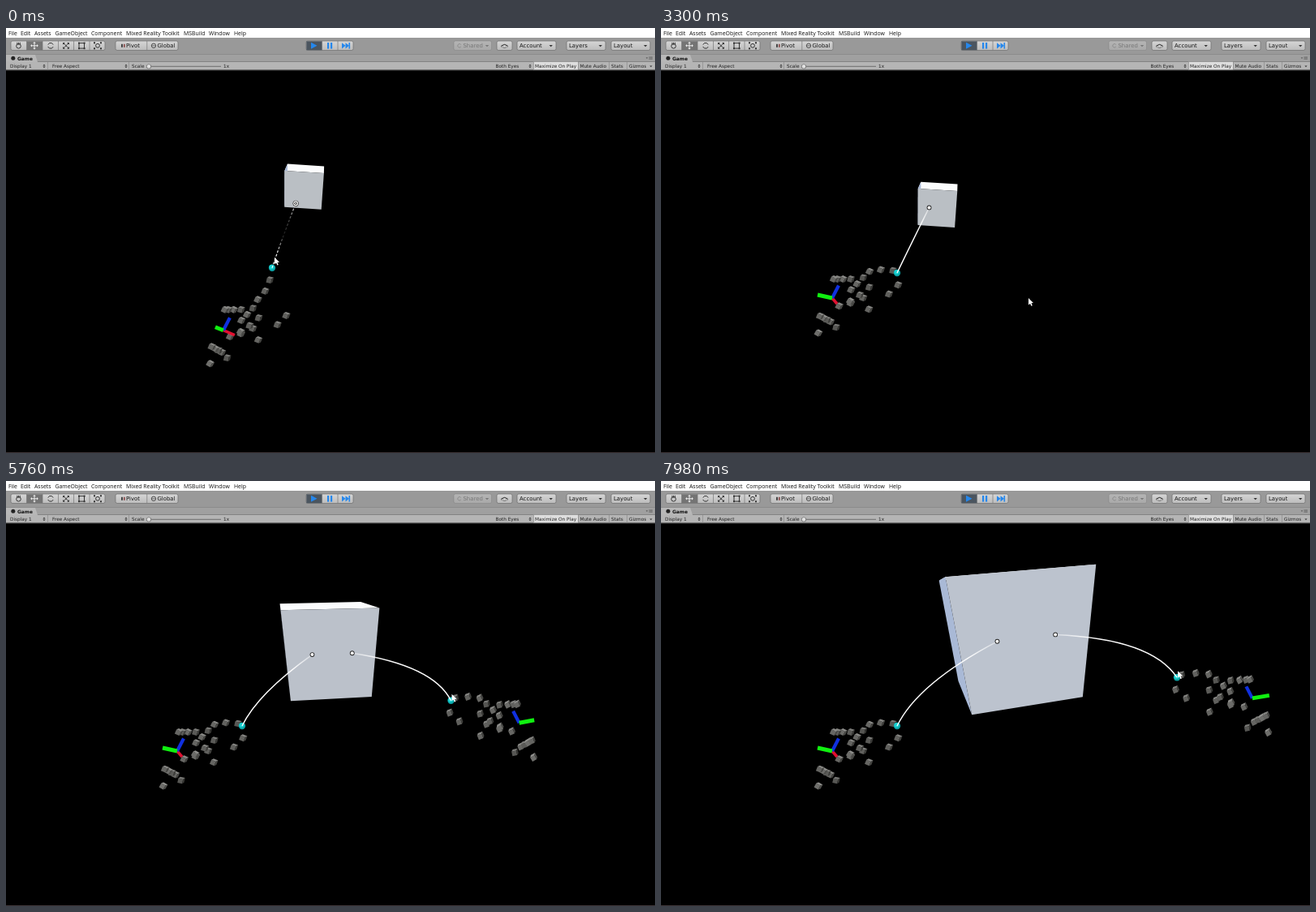
Write an HTML page with a canvas that moves like this. It is 800 px wide and 524 px high and loops after 8 s.

```html
<!DOCTYPE html>
<html lang="en">
<head>
<meta charset="utf-8">
<title>Hand ray manipulation</title>
<style>
html, body { margin: 0; width: 100%; height: 100%; overflow: hidden; background: #000; }
canvas, svg { position: absolute; left: 0; top: 0; display: block; }
.menu { font: 6.9px "Open Sans", sans-serif; fill: #111; }
.bar { font: 6.9px "DejaVu Sans", sans-serif; fill: #161616; }
.row { font: 5.75px "DejaVu Sans", sans-serif; fill: #222; }
.tab { font: bold 5.9px "DejaVu Sans", sans-serif; fill: #111; }
.off { fill: #777; }
</style>
</head>
<body>
<canvas id="stage" width="800" height="524"></canvas>
<svg width="800" height="53">
  <g class="menu">
    <text x="3" y="9">File</text><text x="18" y="9">Edit</text><text x="35" y="9">Assets</text>
    <text x="60.5" y="9">GameObject</text><text x="105" y="9">Component</text>
    <text x="148" y="9">Mixed Reality Toolkit</text><text x="219" y="9">MSBuild</text>
    <text x="250" y="9">Window</text><text x="281" y="9">Help</text>
  </g>
  <g class="bar">
    <text x="148" y="24.3">Pivot</text><text x="186.5" y="24.3">Global</text>
    <text x="563.5" y="24.3" class="off">Shared</text>
    <text x="633" y="24.3">Account</text><text x="694" y="24.3">Layers</text><text x="749" y="24.3">Layout</text>
  </g>
  <text class="tab" x="14" y="39.5">Game</text>
  <g class="row">
    <text x="5" y="49.2">Display 1</text><text x="57" y="49.2">Free Aspect</text>
    <text x="155" y="49.2">Scale</text><text x="268" y="49.2">1x</text>
    <text x="603.5" y="49.2">Both Eyes</text><text x="652" y="49.2">Maximize On Play</text>
    <text x="707.5" y="49.2">Mute Audio</text><text x="746" y="49.2">Stats</text><text x="768" y="49.2">Gizmos</text>
  </g>
</svg>
<script>
const ctx = document.getElementById('stage').getContext('2d');
const LOOP = 8000, STEP = 30;

const mix = (a, b, k) => a + (b - a) * k;
const clamp = (v, lo = 0, hi = 1) => Math.max(lo, Math.min(hi, v));
const ramp = (t, from, to) => clamp((t - from) / (to - from));
const rad = deg => deg * Math.PI / 180;

// Swings from one turning point [time, ...values] to the next.
function swing(keys, t) {
  let i = 0;
  while (i < keys.length - 2 && t >= keys[i + 1][0]) i++;
  const [a, b] = [keys[i], keys[i + 1]];
  const k = 0.5 - 0.5 * Math.cos(Math.PI * ramp(t, a[0], b[0]));
  return a.slice(1).map((v, c) => mix(v, b[c + 1], k));
}

const LEFT_X = [[0, 328], [430, 303], [830, 372], [1300, 301], [1950, 367], [2350, 289], [2650, 291]];
const RIGHT_X = [[4080, 384], [5150, 388], [5800, 550], [6130, 402], [6600, 589], [7320, 403], [7980, 636]];
const POINTER = [[2750, 291, 285], [3300, 453, 333], [3600, 566, 436], [4050, 386, 336]];

function leftHand(t) {
  const [x] = swing(LEFT_X, t);
  return [x, 302 - 0.17 * (x - 291)];
}

function rightHand(t) {
  const [x] = swing(RIGHT_X, t), d = x - 388;
  return [x, 304 - 0.13 * d - 0.00048 * d * d + 37 * (1 - ramp(t, 4080, 4900))];
}

function poly(points, fill) {
  ctx.beginPath();
  for (const p of points) ctx.lineTo(...p);
  ctx.closePath();
  ctx.fillStyle = fill;
  ctx.fill();
}

function rect(x, y, w, h, fill) {
  ctx.fillStyle = fill;
  ctx.fillRect(x, y, w, h);
}

function dot(x, y, r, fill) {
  ctx.beginPath();
  ctx.arc(x, y, r, 0, Math.PI * 2);
  ctx.fillStyle = fill;
  ctx.fill();
}

function ring(x, y, r, from = 0, to = 2 * Math.PI) {
  ctx.beginPath();
  ctx.arc(x, y, r, from, to);
  ctx.stroke();
}

function bar([x, y], dx, dy, width, color) {
  ctx.beginPath();
  ctx.moveTo(x, y);
  ctx.lineTo(x + dx, y + dy);
  ctx.lineWidth = width;
  ctx.strokeStyle = color;
  ctx.stroke();
}

// Triangle pointing along (dx, dy).
function arrow(x, y, dx, dy, color, wide = 1) {
  poly([[x + dx, y + dy], [x - dy * wide, y + dx * wide], [x + dy * wide, y - dx * wide]], color);
}

// ---- Toolbar ----

function button(x, w, parts = 1) {
  const g = ctx.createLinearGradient(0, 16, 0, 27);
  g.addColorStop(0, '#d6d6d6');
  g.addColorStop(1, '#bdbdbd');
  ctx.beginPath();
  ctx.roundRect(x, 16, w, 11.5, 2);
  ctx.fillStyle = g;
  ctx.fill();
  ctx.lineWidth = 0.7;
  ctx.strokeStyle = '#6f6f6f';
  ctx.stroke();
  for (let i = 1; i < parts; i++) rect(x + w * i / parts, 16, 0.7, 11.5, '#777');
}

function icons() {
  ctx.strokeStyle = '#333';
  ctx.lineWidth = 1;
  ring(15.5, 22.3, 2.8);
  for (let i = 0; i < 3; i++) rect(13.4 + i * 1.7, 17.8, 0.9, 3, '#333');
  ring(55, 21.8, 3.4, 0.4, 2.8);
  ring(55, 21.8, 3.4, 3.5, 5.9);
  ctx.strokeRect(90, 18.6, 6.5, 6.5);
  ring(113, 21.8, 2.4);
  for (let i = 0; i < 4; i++) {
    const a = i * Math.PI / 2, c = Math.cos(a), s = Math.sin(a);
    const dx = c - s, dy = c + s;
    bar([35, 21.8], c * 4, s * 4, 1, '#eee');
    arrow(35 + c * 3, 21.8 + s * 3, c * 1.8, s * 1.8, '#eee');
    bar([74, 21.8], dx * 3.2, dy * 3.2, 1, '#333');
    arrow(74 + dx * 2.5, 21.8 + dy * 2.5, dx * 1.4, dy * 1.4, '#333');
    rect(92.3 + dx * 3.3, 20.9 + dy * 3.3, 2, 2, '#333');
    rect(112 + dx * 4, 20.8 + dy * 3.5, 2, 2, '#333');
  }
  rect(142, 19.8, 2, 4, '#444');
  rect(145, 19.8, 1.6, 4, '#844');
  ctx.strokeStyle = '#333';
  ctx.lineWidth = 0.8;
  ring(182, 21.8, 2.7);
  bar([179.3, 21.8], 5.4, 0, 0.6, '#333');
  for (const [x, r] of [[612, 1.7], [614.5, 2.5], [617, 1.7]]) dot(x, 23.4 - r * 0.5, r, '#444');
  for (const [x, r] of [[612, 1], [614.5, 1.8], [617, 1]]) dot(x, 23.4 - r * 0.5, r, '#cacaca');
  ctx.strokeStyle = '#777';
  ring(559, 21.8, 2.2, 0.5, 5.6);

  const blue = '#2587ec';
  arrow(376, 21.8, 7.5, 0, blue, 0.53);
  arrow(414, 21.8, 4.5, 0, blue, 0.8);
  arrow(418.5, 21.8, 4.5, 0, blue, 0.8);
  for (const x of [396, 400]) rect(x, 18, 2.2, 7.6, blue);
  rect(422.5, 18, 1.6, 7.6, blue);
}

function toolbar() {
  rect(0, 0, 800, 12, '#fff');
  rect(0, 12, 800, 20, '#999');
  rect(0, 32, 800, 9.5, '#a0a0a0');
  rect(0, 32, 800, 0.7, '#858585');
  poly([[0, 42], [0, 33], [36, 33], [39, 42]], '#b8b8b8');
  rect(0, 41.5, 800, 10, '#b5b5b5');
  rect(0, 51.3, 800, 1, '#777');

  button(6, 116, 6);
  button(135, 77, 2);
  button(370, 58, 3);
  for (const [x, w] of [[605, 19], [630, 48], [691, 48], [746, 48]]) button(x, w);
  ctx.globalAlpha = 0.45;
  button(552, 46.5);
  ctx.globalAlpha = 1;
  rect(25.5, 16.3, 19.5, 11, '#747474');
  rect(370.3, 16.3, 19, 11, '#4b555f');
  icons();

  for (const x of [593, 671.7, 732.7, 788.2]) arrow(x, 21, 0, 2.2, x < 600 ? '#777' : '#333');
  for (const x of [47, 148, 646]) {
    arrow(x, 46.4, 0, -1.6, '#333');
    arrow(x, 47.6, 0, 1.6, '#333');
  }
  arrow(795, 46.6, 0, 1.6, '#333');
  arrow(790, 36.4, 0, 1.4, '#444');
  for (const y of [35.7, 37.7]) rect(792.5, y, 4.5, 0.7, '#444');
  dot(8.8, 37.2, 2.5, '#222');
  rect(650, 41.8, 55, 9.5, '#dedede');
  for (const x of [51, 151, 650, 705, 743, 765]) rect(x, 42, 0.7, 9.5, '#8c8c8c');
  rect(177, 46.8, 88, 1, '#6d6d6d');
  dot(176, 47.4, 2.9, '#666');
  dot(176, 47.4, 2.3, '#e1e1e1');
}

// ---- Box ----

function boxSize(t, x) {
  if (t < 4080) return 47;
  const d = Math.max(0, x - (t < 5900 ? 388 : 403));
  return t < 5900 ? 47 + 0.282 * d + 0.00072 * d * d : 64 + 0.149 * d + 0.00115 * d * d;
}

// The box turns, tilts and gains perspective as it grows.
function makeBox(size, dx, dy) {
  const u = (size - 47) / 114;
  const cx = 296 + 0.94 * size + dx, cy = 222 - 28 * u * u + dy;
  const height = 0.955 + 0.08 * u, taper = 0.016 + 0.06 * u;
  const roll = 0.064 - 0.18 * u, lean = 0.035 - 0.085 * u;
  const corner = (sx, sy) => [
    cx + size * (sx * (0.5 - sy * taper) - sy * lean / 2),
    cy + size * (sy * (height / 2 - sx * 0.01 * u) + sx * roll / 2)
  ];
  const depth = 0.07 + 0.2 * u;
  const back = ([x, y]) => [
    mix(x, cx, depth) + 2 - 12 * u - 24 * u * u,
    mix(y, cy, depth) - 10 - 24 * u + 18 * u * u
  ];
  return { u, corner, back, at: k => [cx + k * size, cy + k * roll * size] };
}

function drawBox({ u, corner, back }) {
  const tl = corner(-1, -1), tr = corner(1, -1), br = corner(1, 1), bl = corner(-1, 1);
  poly([tl, tr, back(tr), back(tl)], '#fbfcfd');
  poly([tl, bl, back(bl), back(tl)], '#a9b9d6');
  poly([tl, tr, br, bl], `rgb(${186 + 2 * u},${191 + 4 * u},${196 + 10 * u})`);
}

// ---- Hands ----

// Joints in a row, each bone turned further than the last.
function chain(x, y, start, turn, bones) {
  const joints = [[x, y]];
  bones.forEach((len, i) => {
    const a = rad(start + turn * i);
    joints.push([x += len * Math.cos(a), y += len * Math.sin(a)]);
  });
  return joints;
}

// Joint offsets from the fingertip sphere, from relaxed (0) to pinched (1).
function skeleton(pinch) {
  const joints = [[-97, 74], ...chain(-75, 67, -29, -8, [46, 31, 16])];
  for (let f = 0; f < 4; f++) {
    const start = f ? 18 * f - 22 : mix(-30, -22, pinch);
    const turn = f ? 62 : mix(-18, 13, pinch);
    joints.push([-82 - 4.3 * f, 60 - 2.3 * f]);
    joints.push(...chain(-57 - 11 * f + 1.35 * f * f, 7.5, start, turn, [25, 14, 15]));
  }
  return joints.map(([x, y]) => [x + 17 * (1 - pinch), y + 44 * (1 - pinch)]);
}

function joint(x, y, seed, flip) {
  const noise = Math.abs(Math.sin(seed * 12.9898) * 43758.5453) % 1;
  const tone = 86 + noise * 26;
  const grey = d => `rgb(${tone + d},${tone + d},${tone + d - 3})`;
  ctx.save();
  ctx.translate(x, y);
  ctx.rotate(flip * (0.2 + noise * 0.35));
  poly([[-4, -1.6], [2, -1.6], [2, 4], [-4, 4]], grey(0));
  poly([[-4, -1.6], [-2, -4], [4, -4], [2, -1.6]], grey(34));
  poly([[2, -1.6], [4, -4], [4, 1.8], [2, 4]], grey(-32));
  ctx.restore();
}

function hand([x, y], pinch, flip) {
  const stretch = 1 + (flip > 0 ? 291 - x : x - 507) * 0.00125;
  const lift = flip < 0 ? Math.max(0, x - 388) * 0.00027 : 0;
  const place = (ox, oy) => [x + flip * ox * stretch, y + oy + ox * lift];
  skeleton(pinch).forEach((j, i) => joint(...place(...j), i + 1, flip));

  const palm = place(mix(-63, -80, pinch), mix(77, 31, pinch));
  if (flip > 0) {
    bar(palm, mix(14, 6, pinch), mix(6, 7, pinch), 3.6, '#e01030');
    bar(palm, 8, -15.5, 4.2, '#1030e0');
    bar(palm, mix(-10, -18, pinch), -4, 5, '#10f010');
  } else {
    const facing = 1 - ramp(x, 388, 540);
    bar(palm, 9 * facing, -6 * facing, 3, '#d01030');
    bar(palm, -7.5, -14.5, 4.2, '#1030e0');
    bar(palm, 14 + (x - 388) * 0.028, -3.5, 5, '#10f010');
  }
  dot(x, y, 4.2, '#0aa3a6');
  dot(x - 0.6, y - 0.9, 3, '#19d0d0');
}

// ---- Rays ----

function ray([x, y], [ex, ey], dir, solid) {
  const reach = 0.36 * Math.hypot(ex - x, ey - y) / Math.hypot(...dir);
  const g = ctx.createLinearGradient(x, y, ex, ey);
  const stops = solid ? [1, 1, 1, 0.95, 0.4] : [1, 0.9, 0.1, 0.3, 1];
  stops.forEach((a, i) => g.addColorStop(i / 4, `rgba(255,255,255,${a})`));
  ctx.beginPath();
  ctx.moveTo(x, y);
  ctx.quadraticCurveTo(x + dir[0] * reach, y + dir[1] * reach, ex, ey);
  ctx.setLineDash(solid ? [] : [3, 2]);
  ctx.lineWidth = solid ? 1.4 : 1.2;
  ctx.strokeStyle = g;
  ctx.stroke();
  ctx.setLineDash([]);

  dot(ex, ey, solid ? 2.9 : 3.6, '#222');
  dot(ex, ey, solid ? 2 : 2.9, '#fff');
  if (!solid) {
    dot(ex, ey, 1.8, '#333');
    dot(ex, ey, 0.9, '#ddd');
  }
}

function pointer(x, y) {
  const outline = [[0, 0], [0, 8.5], [2, 6.8], [3.4, 9.8], [4.8, 9.2], [3.5, 6.3], [6, 6]];
  poly(outline.map(([px, py]) => [x + px, y + py]), '#fff');
}

function draw(t) {
  rect(0, 0, 800, 524, '#000');
  rect(0, 523, 800, 1, '#3a3234');
  toolbar();

  const left = leftHand(t), right = rightHand(t);
  const leftPinch = ramp(t, 60, 240), rightPinch = ramp(t, 4890, 5040);
  const twoHands = t >= 4080;

  const pull = left[0] - 291, raised = 1 - ramp(t, 850, 1300);
  const box = makeBox(boxSize(t, right[0]), 0.53 * pull + 7 * raised, 0.05 * pull - 24 * raised);
  drawBox(box);
  hand(left, leftPinch, 1);
  if (twoHands) hand(right, rightPinch, -1);

  const [endX, endY] = box.at(-0.205);
  const target = [endX, endY + 17 * (1 - leftPinch)];
  const aim = t < 2650 ? [mix(target[0] - left[0], 22, 0.4), target[1] - left[1]] : [39, -81];
  ray(left, target, aim, leftPinch > 0.5);
  if (twoHands) {
    const aimX = -0.42 - Math.max(0, right[0] - 529) * 0.0016;
    ray(right, box.at(0.24), [aimX, -0.9], rightPinch > 0.5);
  }

  if (t < 2750) pointer(left[0] + 3 * (1 - leftPinch), left[1] - mix(13, 17, leftPinch));
  else if (!twoHands) pointer(...swing(POINTER, t));
  else pointer(right[0] + 1, right[1] - 8);
}

function tick() {
  const t = performance.now() % LOOP;
  draw(Math.floor(t / STEP) * STEP);
  requestAnimationFrame(tick);
}
tick();
</script>
</body>
</html>
```
